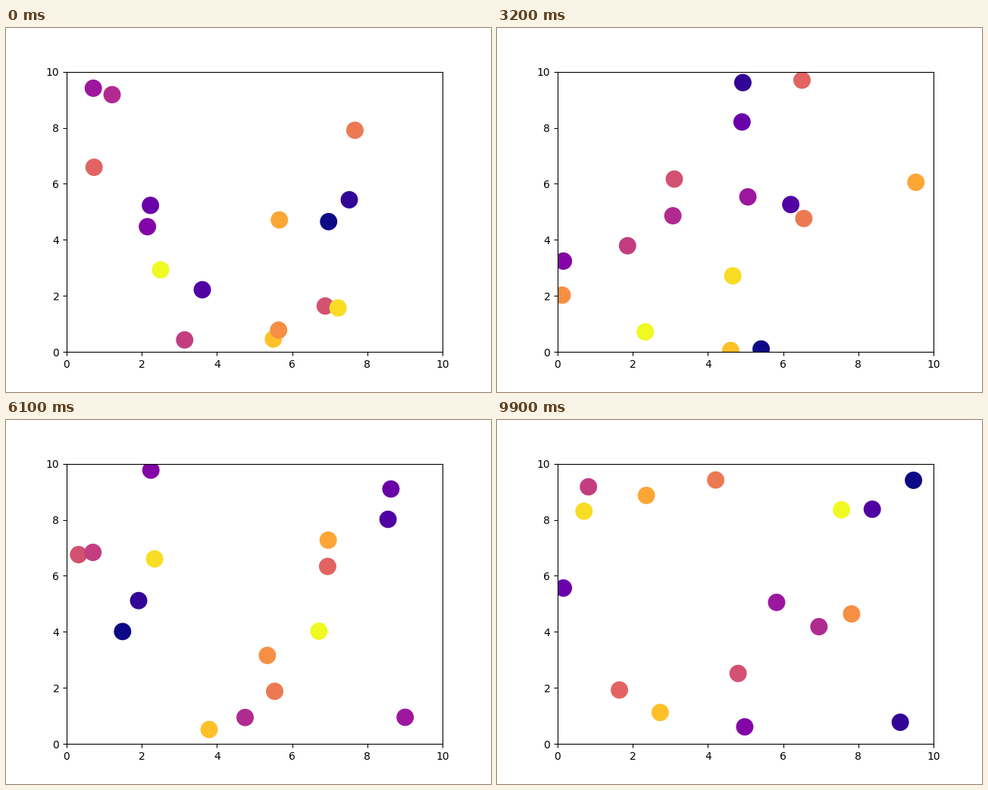
A matplotlib script that plays this animation: 640 px wide and 480 px high, repeating every 10 s.

```python
import numpy as np
import matplotlib.pyplot as plt
from matplotlib.animation import FuncAnimation

SIZE = 10
FRAMES = 100

# Key points, back to front: where each ball starts
# and how far it travels in one loop
start = np.array([
    (5.50, 0.46), (1.21, 9.18), (2.50, 2.93), (6.88, 1.64),
    (7.52, 5.43), (7.67, 7.91), (2.23, 5.23), (5.66, 4.71),
    (0.71, 9.41), (7.22, 1.57), (3.14, 0.43), (6.97, 4.65),
    (0.73, 6.59), (3.61, 2.22), (5.64, 0.78), (2.15, 4.47),
])
travel = np.array([
    (-2.8, -1.6), (5.8, -13.5), (-15.1, -11.4), (-11.8, -24.4),
    (23.6, 15.5), (-3.5, 22.9), (-22.3, 9.3), (12.1, 4.2),
    (13.6, 15.8), (-8.0, -13.4), (-4.0, 10.5), (23.8, -14.2),
    (-22.6, 11.6), (8.1, 9.5), (-18.0, 3.9), (-7.2, -24.1),
])

# Neighbours in depth get shades from far apart on the colormap
count = len(start)
shades = (13 + 9 * np.arange(count)) % count / (count - 1)


def bounce(p):
    """Fold a straight path back into the box at its walls."""
    return SIZE - np.abs(SIZE - p % (2 * SIZE))


def positions(n):
    return bounce(start + travel * n / FRAMES)


fig, ax = plt.subplots(figsize=(6.4, 4.8), dpi=100)
ax.set(xlim=(0, SIZE), ylim=(0, SIZE))
balls = ax.scatter(*positions(0).T, s=240, c=plt.cm.plasma(shades))


def update(n):
    balls.set_offsets(positions(n))
    return (balls,)


anim = FuncAnimation(fig, update, frames=FRAMES, interval=100,
                     repeat=True, repeat_delay=0)
plt.show()
```
